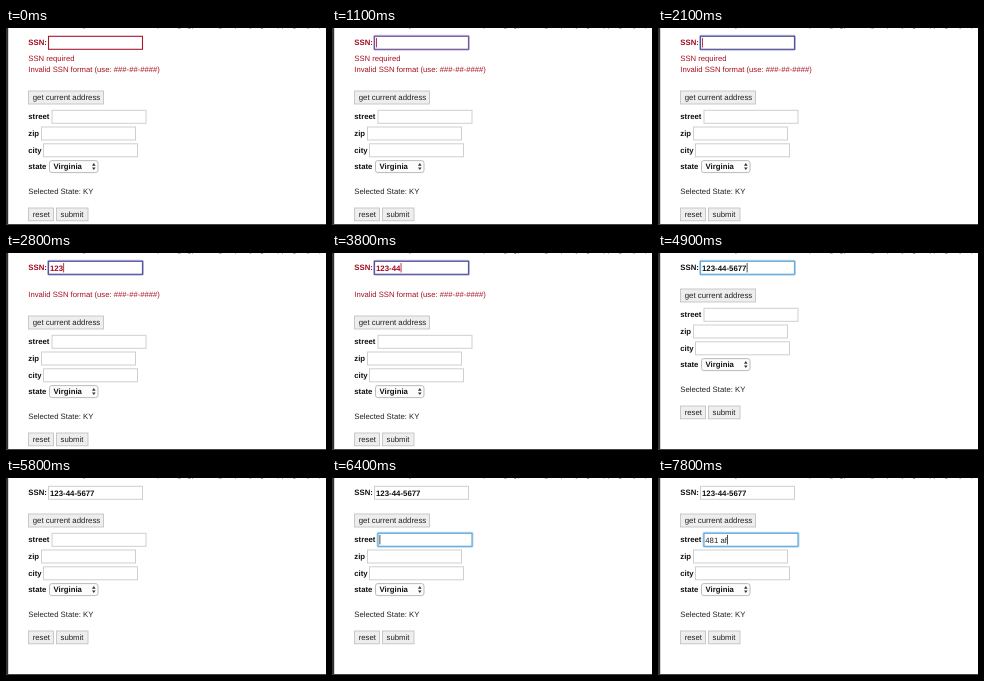
Write an HTML page that moves like this. It is 320 px wide and 197 px high and loops after 8000 ms.

```html
<!DOCTYPE html>
<html>
<head>
<meta charset="utf-8">
<style>
html, body { margin: 0; width: 100%; height: 100%; overflow: hidden; background: #fff }
svg { display: block }
text { font: 7.75px "Liberation Sans", Arial, sans-serif; fill: #222; text-rendering: geometricPrecision; white-space: pre }
.bold { font-weight: bold; fill: #111 }
.error { font-size: 7.7px; fill: #a80f22 }
.field { fill: #fff; stroke: #cfcfcf; stroke-width: 1 }
.button { fill: #eee; stroke: #c3c3c3; stroke-width: .9 }
.ring { fill: none; stroke: #70acd9; stroke-width: 1.6 }
.glow { fill: none; stroke: #b7d9f2; stroke-width: 3 }
.invalid #ssnLabel, .invalid #ssnText { fill: #a30c20 }
.invalid #ssnCaret { fill: #a30c20 }
</style>
</head>
<body>
<svg id="stage" width="320" height="197" viewBox="0 0 320 197">
  <text x="77" y="-1" style="fill:#555">y</text>
  <text x="151" y="-1" style="fill:#555">p     , (y  gp      ,   (y     p ,   y   g      pp   g,    y   (   p</text>
  <rect width="2.2" height="197" fill="#333"/>

  <text id="ssnLabel" class="bold" x="22.3" y="17.3">SSN:</text>
  <rect id="ssnGlow" class="glow" x="42.5" y="8.3" width="94" height="13" rx="1"/>
  <rect id="ssnBox" class="field" x="42.5" y="8.3" width="94" height="13"/>
  <text id="ssnText" class="bold" x="44" y="17.5" style="font-size:7.85px"></text>
  <rect id="ssnCaret" y="10" width=".8" height="9.4" fill="#222"/>
  <text id="required" class="error" x="22.3" y="32.8">SSN required</text>
  <text id="format" class="error" x="22.3" y="43.7">Invalid SSN format (use: ###-##-####)</text>

  <g id="form">
    <rect class="button" x="22.5" y="63" width="75" height="13"/>
    <text x="26.7" y="72.3" style="font-size:7.85px">get current address</text>

    <text class="bold" x="22.3" y="91.2">street</text>
    <rect id="streetGlow" class="glow" x="46" y="82.3" width="94" height="13" rx="1"/>
    <rect id="streetBox" class="field" x="46" y="82.3" width="94" height="13"/>
    <text id="streetText" x="47.3" y="91.6"></text>
    <rect id="streetCaret" y="84" width=".8" height="9.4" fill="#222"/>

    <text class="bold" x="22.3" y="107.9">zip</text>
    <rect class="field" x="35.5" y="99" width="94" height="13"/>
    <text class="bold" x="22.3" y="124.7">city</text>
    <rect class="field" x="37.5" y="115.8" width="94" height="13"/>

    <text class="bold" x="22.3" y="141.2">state</text>
    <rect x="43.5" y="132.6" width="48.5" height="12" rx="2.3" fill="#fcfcfc" stroke="#b5b5b5" stroke-width=".9"/>
    <text class="bold" x="47.6" y="141.2">Virginia</text>
    <path d="M86 137.8l1.8-2.7 1.8 2.7zM86 139.4l1.8 2.7 1.8-2.7z" fill="#333"/>

    <text x="22.3" y="165.8">Selected State: KY</text>
    <rect class="button" x="22.5" y="180" width="25" height="12.8"/>
    <text x="26.7" y="189.2">reset</text>
    <rect class="button" x="50.5" y="180" width="31.5" height="12.8"/>
    <text x="54.5" y="189.2">submit</text>
  </g>
  <rect y="196" width="320" height="1" fill="#444"/>
</svg>
<script>
const $ = id => document.getElementById(id);
const LOOP = 8000;
const SSN = "123-44-5677", STREET = "481 af";
// Time at which each character appears.
const ssnKeys = [2400, 2500, 2800, 3600, 3700, 3800, 4000, 4100, 4200, 4500, 4900];
const streetKeys = [6900, 7100, 7400, 7600, 7800, 7800];

const within = (t, ...spans) => spans.some(([from, to]) => t >= from && t < to);
const typed = (text, keys, t) => text.slice(0, keys.filter(k => k <= t).length);
const show = (id, on) => $(id).style.display = on ? "" : "none";

function input(name, text, caretOn) {
  const label = $(name + "Text");
  if (label.textContent !== text) label.textContent = text;
  const width = text ? label.getComputedTextLength() : 0;
  $(name + "Caret").setAttribute("x", +label.getAttribute("x") + width + .2);
  show(name + "Caret", caretOn);
}

function border(name, color, width, glow) {
  const box = $(name + "Box").style;
  box.stroke = color;
  box.strokeWidth = width;
  show(name + "Glow", !!glow);
  if (glow) $(name + "Glow").style.stroke = glow;
}

function draw(t) {
  const invalid = t < 4900;
  $("stage").classList.toggle("invalid", invalid);
  show("required", t < 2400);
  show("format", invalid);
  $("form").setAttribute("transform", `translate(0 ${invalid ? 0 : -27})`);

  if (t < 1100) border("ssn", "#a71930", 1.1);
  else if (t < 1200) border("ssn", "#76569a", 1.2, "#c9c3e6");
  else if (invalid) border("ssn", "#5b5198", 1.2, "#b4c1e8");
  else if (t < 5800) border("ssn", "#68a9d8", 1.2, "#b7d9f2");
  else border("ssn", "#cfcfcf", 1);

  if (t >= 6400) border("street", "#68a9d8", 1.2, "#b7d9f2");
  else border("street", "#cfcfcf", 1);

  input("ssn", typed(SSN, ssnKeys, t), within(t, [1100, 1600], [2100, 3300], [3600, 5400]));
  input("street", typed(STREET, streetKeys, t), t >= 6400);
}

const start = performance.now();
function tick() {
  draw((performance.now() - start) % LOOP);
  requestAnimationFrame(tick);
}
tick();
</script>
</body>
</html>
```
